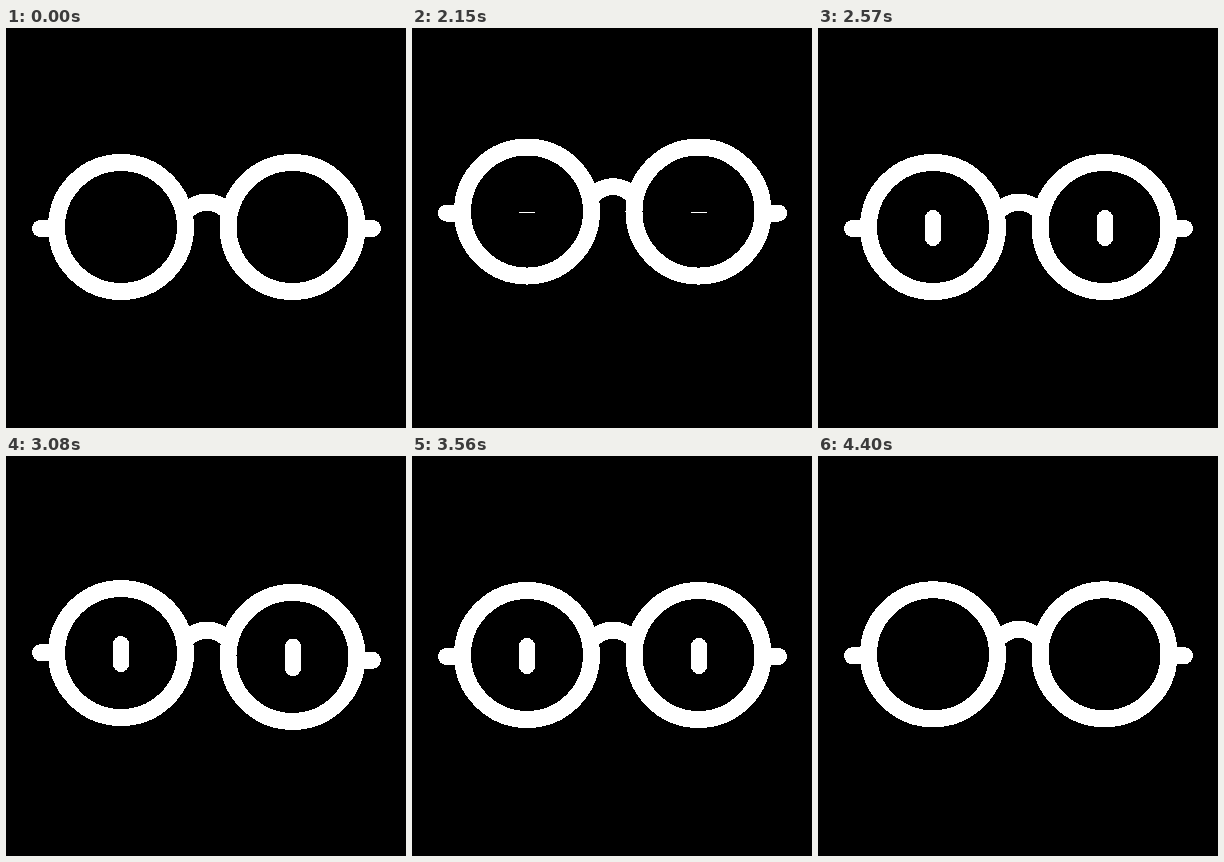
Recreate the animation shown at these times as an HTML page. Size 400 by 400 pixels, loop 4.43 s.

```html
<!DOCTYPE html>
<html lang="en">
<head>
<meta charset="utf-8">
<title>Blinking glasses</title>
<style>
  html, body { margin: 0; height: 100%; overflow: hidden; background: #000; }
  svg { display: block; width: 100%; height: 100%; shape-rendering: crispEdges; }
</style>
</head>
<body>
<svg viewBox="0 0 400 400">
  <g id="frame" fill="none" stroke="#fff" stroke-width="17" stroke-linecap="round">
    <circle cx="115" cy="199" r="64.5"/>
    <circle cx="286.5" cy="199" r="64.5"/>
    <path d="M179 184Q201 164 223 184M34.5 200.5H50M351 200.5H366.5"/>
  </g>
  <rect id="left" x="-8" y="-18" width="16" height="36" rx="8" fill="#fff"/>
  <rect id="right" x="-8" y="-18" width="16" height="36" rx="8" fill="#fff"/>
</svg>
<script>
const LOOP = 4430;
const [frame, left, right] = ['frame', 'left', 'right'].map(id => document.getElementById(id));

const progress = (t, from, to) => Math.min(1, Math.max(0, (t - from) / (to - from)));

// Goes from 0 to 1, slow at first
function rise(t, from, to) {
  const u = progress(t, from, to) ** 2;
  return u * u * (3 - 2 * u);
}

// Goes from 0 to 1 and back; skew below 1 puts the peak earlier
const hump = (t, from, to, skew = 1) => Math.sin(Math.PI * progress(t, from, to) ** skew);

function placeEye(eye, x, y, size) {
  eye.setAttribute('transform', `translate(${x} ${y}) scale(1 ${size})`);
  eye.setAttribute('visibility', size > 0.01 ? 'visible' : 'hidden');
}

function draw(t) {
  const lift = -19 * hump(t, 2000, 2215) + 10 * hump(t, 2215, 2570, 0.65)
    + 10 * hump(t, 4040, 4230) - 4 * hump(t, 4230, 4410);
  const tilt = 4.2 * (rise(t, 2940, 3170) - rise(t, 3350, 3560));
  const open = rise(t, 2110, 2250) + 0.1 * hump(t, 2200, 2450) - rise(t, 4040, 4190);
  const drop = 86 * Math.sin(tilt * Math.PI / 180);

  frame.setAttribute('transform', `translate(0 ${lift}) rotate(${tilt} 200.75 199.5)`);
  placeEye(left, 115, 200 + lift - drop, open);
  placeEye(right, 287, 200 + lift + drop * 0.7, open * (1 + 0.04 * tilt));
}

let start;
function tick(now) {
  start ??= now;
  draw((now - start) % LOOP);
  requestAnimationFrame(tick);
}
draw(0);
requestAnimationFrame(tick);
</script>
</body>
</html>
```
